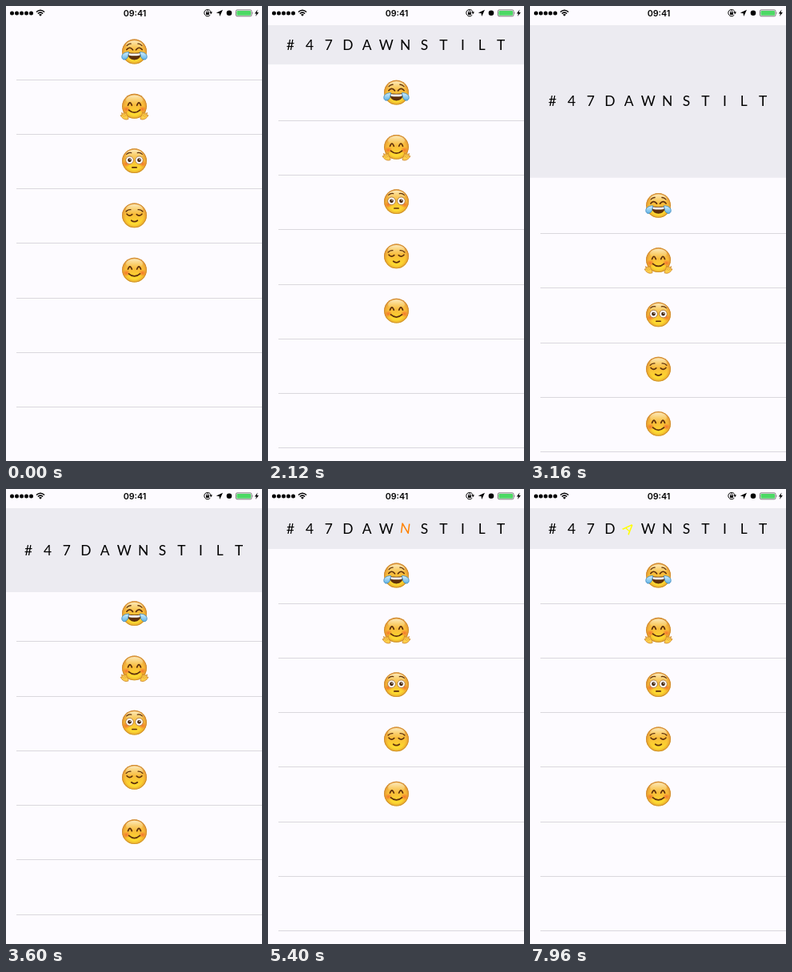
An HTML page for the animation above (8000 ms loop, 320 by 569 pixels).

```html
<!DOCTYPE html>
<html lang="en">
<head>
<meta charset="utf-8">
<title>Pull to refresh</title>
<style>
html, body { margin: 0; width: 100%; height: 100%; overflow: hidden; background: #fdfbff; }
svg { display: block; width: 100%; height: 100%; }
.clock { font: 600 10.7px Inter, Roboto, sans-serif; text-anchor: middle; }
.letter { font: 400 17.4px Lato, "Open Sans", sans-serif; text-anchor: middle; }
.ink { fill: none; stroke: #5e300c; stroke-width: 1.7; stroke-linecap: round; stroke-linejoin: round; }
.thin { stroke-width: 1.3; }
</style>
</head>
<body>
<svg viewBox="0 0 320 569">
  <defs>
    <linearGradient id="skin" x2="0" y2="1">
      <stop offset="0" stop-color="#f3bd58"/>
      <stop offset=".45" stop-color="#f8bb3a"/>
      <stop offset=".75" stop-color="#fdd32f"/>
      <stop offset="1" stop-color="#ffe736"/>
    </linearGradient>
    <radialGradient id="rim">
      <stop offset=".72" stop-color="#d8842a" stop-opacity="0"/>
      <stop offset=".9" stop-color="#d8842a" stop-opacity=".4"/>
      <stop offset="1" stop-color="#bd7426" stop-opacity=".95"/>
    </radialGradient>
    <linearGradient id="shine" x2="0" y2="1">
      <stop offset="0" stop-color="#fff5d0" stop-opacity=".85"/>
      <stop offset="1" stop-color="#ffdf80" stop-opacity=".1"/>
    </linearGradient>
    <radialGradient id="rosy">
      <stop offset="0" stop-color="#f2602c" stop-opacity=".8"/>
      <stop offset="1" stop-color="#f2602c" stop-opacity="0"/>
    </radialGradient>
    <linearGradient id="water" x2="0" y2="1">
      <stop offset="0" stop-color="#d3effc"/>
      <stop offset="1" stop-color="#5fb2e6"/>
    </linearGradient>
    <clipPath id="window"><rect id="windowRect" x="0" y="24" width="320" height="0"/></clipPath>

    <g id="face">
      <circle r="15.4" fill="url(#skin)"/>
      <circle r="15.4" fill="url(#rim)"/>
      <ellipse cy="-8" rx="10.6" ry="5.8" fill="url(#shine)"/>
    </g>
    <g id="blush">
      <ellipse cx="-10" cy="3.8" rx="5" ry="4.4" fill="url(#rosy)"/>
      <ellipse cx="10" cy="3.8" rx="5" ry="4.4" fill="url(#rosy)"/>
    </g>
    <path id="happyEyes" class="ink" d="M-8-1Q-5.6-7.6-3.2-1M3.2-1Q5.6-7.6 8-1"/>
    <path id="smile" class="ink" d="M-7 4.8Q0 11 7 4.8"/>
    <path id="tear" d="M-6.8 .6C-12 .2-17 3.4-15.4 8.2C-13.6 11.8-8.8 9.8-8 6Q-7.4 3-6.8 .6Z" fill="url(#water)" stroke="#3784bd" stroke-width=".8"/>
    <g id="hand">
      <path d="M-7.6 16.2C-11.6 17.6-15.2 15.6-17.4 11.4L-15.4 11.6L-15.9 8L-13.8 10.2L-13.2 6.6L-11.6 9.4L-10.2 7.2L-9.4 11.6Q-7.2 13-7.6 16.2Z" fill="#fdcf4a" stroke="#d18a2e" stroke-width=".9" stroke-linejoin="round"/>
      <path d="M-14.4 11.4L-12.6 13.6M-12.2 10L-11 12.8" stroke="#d18a2e" stroke-width=".6"/>
    </g>

    <g id="joy">
      <use href="#face"/>
      <path class="ink" d="M-9.6-2.4Q-6-7.2-2-2.2M2-2.2Q6-7.2 9.6-2.4"/>
      <path class="ink thin" d="M-9.4-7.4Q-7.2-10-4.4-9.8M9.4-7.4Q7.2-10 4.4-9.8"/>
      <path d="M-9 1Q0 2.4 9 1Q8 10.2 0 10.4Q-8 10.2-9 1Z" fill="#5e300c"/>
      <path d="M-7.6 1.9Q0 3.1 7.6 1.9L6.8 4.8Q0 5.8-6.8 4.8Z" fill="#fff"/>
      <use href="#tear"/><use href="#tear" transform="scale(-1 1)"/>
    </g>
    <g id="hug">
      <use href="#face"/><use href="#blush"/><use href="#happyEyes"/><use href="#smile"/>
      <use href="#hand"/><use href="#hand" transform="scale(-1 1)"/>
    </g>
    <g id="flushed">
      <use href="#face"/><use href="#blush"/>
      <path class="ink thin" d="M-9.8-8.2Q-7.2-10.8-3.8-10M9.8-8.2Q7.2-10.8 3.8-10"/>
      <g fill="#fff" stroke="#a9743a" stroke-width=".9">
        <circle cx="-6" cy="-.8" r="4.8"/><circle cx="6" cy="-.8" r="4.8"/>
      </g>
      <g fill="#43250f"><circle cx="-6" cy="-.8" r="2.4"/><circle cx="6" cy="-.8" r="2.4"/></g>
      <g fill="#fff"><circle cx="-5.4" cy="-1.6" r=".7"/><circle cx="6.6" cy="-1.6" r=".7"/></g>
      <path class="ink" d="M-2.6 8.4H2.6"/>
    </g>
    <g id="calm">
      <use href="#face"/>
      <path class="ink thin" d="M-10.4-4.8Q-8-7.6-4.6-7.2M10.4-4.8Q8-7.6 4.6-7.2"/>
      <path class="ink" d="M-9.4-1.6Q-6.2 2-2.8-1.2M9.4-1.6Q6.2 2 2.8-1.2"/>
      <path class="ink" d="M-3.8 6.4Q0 9.4 3.8 6.4"/>
    </g>
    <g id="glad">
      <use href="#face"/><use href="#blush"/><use href="#happyEyes"/><use href="#smile"/>
    </g>
  </defs>

  <rect width="320" height="569" fill="#fdfbff"/>
  <rect id="header" y="24" width="320" height="0" fill="#ecebf1"/>
  <g clip-path="url(#window)"><g id="title"></g></g>
  <g id="lines" fill="#dad8dd"></g>
  <g id="list"></g>

  <g id="status">
    <g id="signal"></g>
    <g fill="none" stroke="#000" stroke-width="1.5">
      <path d="M37.9 7.5Q43 2.9 48.1 7.5M39.8 9.5Q43 6.7 46.2 9.5"/>
    </g>
    <path d="M41 10.7Q43 9.1 45 10.7L43 12.8Z"/>
    <text class="clock" x="161" y="12.6">09:41</text>
    <path d="M255.3 11.2A4.2 4.2 0 1 1 256.2 8.2" fill="none" stroke="#000"/>
    <path d="M254.4 7.6H258L256.2 10.2Z"/>
    <rect x="250" y="8" width="4" height="3"/>
    <path d="M250.8 8V7A1.2 1.2 0 0 1 253.2 7V8" fill="none" stroke="#000" stroke-width=".8"/>
    <path d="M271 4.8L267.2 13L266.6 9.2L262.8 8.6Z"/>
    <circle cx="279" cy="8.8" r="3.3"/>
    <rect x="287.4" y="4.9" width="19.6" height="7.9" rx="1.6" fill="#fff" stroke="#555" stroke-width=".8"/>
    <rect x="288.4" y="5.9" width="17.6" height="5.9" rx=".8" fill="#4cd964"/>
    <path d="M307.8 7.2Q309.4 8.8 307.8 10.4Z" fill="#555"/>
    <path d="M314.6 4.6L310.8 9.4H313L312 13L315.9 8.1H313.6Z"/>
  </g>
</svg>

<script>
const LOOP = 8000, STEP = 40, ROW = 68.27, TOP = 24;
const WORD = "#47DAWNSTILT";
const COLORS = ["#ff00ff", "#996633", "#ffff00", "#ff0000", "#00ff00", "#0000ff", "#ff8000"];
const REST = 51, PEAK = 205, RELEASE = 3380, SPIN_START = 4280;
const TURN = 116.7, BACK = 66.7, SLOT = TURN + BACK;
const GROW = 366.7, SHRINK = 266.7;
const SPIN = SLOT * WORD.length, CYCLE = SPIN + GROW + SHRINK;

// Finger drag: time, offset, speed in px per ms
const DRAG = [
  [1440, 0, 0.03], [1680, 13.2, 0.072], [2000, 38, 0.1],
  [2520, 101.7, 0.125], [3160, 192.3, 0.095], [RELEASE, PEAK, 0.02]
];

const byId = id => document.getElementById(id);
function add(parent, tag, attrs, text) {
  const el = document.createElementNS("http://www.w3.org/2000/svg", tag);
  for (const key in attrs) el.setAttribute(key, attrs[key]);
  if (text) el.textContent = text;
  return parent.appendChild(el);
}

for (let i = 0; i < 5; i++) add(byId("signal"), "circle", { cx: 7.5 + 6 * i, cy: 8.9, r: 2.5 });
["joy", "hug", "flushed", "calm", "glad"].forEach((name, i) =>
  add(byId("list"), "use", { href: "#" + name, x: 160.5, y: 57 + ROW * i }));
const lines = Array.from({ length: 8 }, () => add(byId("lines"), "rect", { x: 13, width: 307, height: 1 }));
const letters = [...WORD].map(ch => add(byId("title"), "text", { class: "letter", y: 6.3 }, ch));

function hermite([t0, a, va], [t1, b, vb], t) {
  const d = t1 - t0, s = (t - t0) / d, r = 1 - s;
  return r * r * (1 + 2 * s) * a + s * s * (3 - 2 * s) * b + s * r * d * (r * va - s * vb);
}

function pull(t) {
  if (t <= DRAG[0][0]) return 0;
  if (t >= RELEASE) {
    const u = (t - RELEASE) * 0.0109;
    return REST + (PEAK - REST) * (1 + u) * Math.exp(-u);
  }
  const i = DRAG.findIndex(p => p[0] > t);
  return hermite(DRAG[i - 1], DRAG[i], t);
}

function titleState(t) {
  const state = { active: -1, angle: 0, color: "#000", scale: 1 };
  if (t < SPIN_START) return state;
  const round = Math.floor((t - SPIN_START) / CYCLE);
  const u = (t - SPIN_START) % CYCLE;
  if (u < SPIN) {
    state.active = Math.floor(u / SLOT);
    const v = u % SLOT;
    const turning = v < TURN;
    state.angle = 45 * (turning ? v / TURN : (SLOT - v) / BACK);
    if (turning) state.color = COLORS[(round * WORD.length + state.active) % COLORS.length];
  } else {
    const v = u - SPIN;
    state.scale = 1 + 0.5 * (v < GROW ? v / GROW : (CYCLE - u) / SHRINK);
  }
  return state;
}

function draw(t) {
  const offset = pull(t);
  const height = pull(t - 1000 / 60);   // the header trails the list by one refresh
  byId("header").setAttribute("height", height);
  byId("windowRect").setAttribute("height", height);
  byId("list").setAttribute("transform", `translate(0 ${offset})`);
  lines.forEach((line, i) => line.setAttribute("y", Math.floor(23.9 + ROW * (i + 1) + offset)));

  const { active, angle, color, scale } = titleState(t);
  const mid = TOP + height / 2 - 0.3;
  letters.forEach((el, i) => {
    const on = i === active;
    el.setAttribute("transform", `translate(${28 + 23.93 * i} ${mid}) rotate(${on ? angle : 0}) scale(${scale})`);
    el.setAttribute("fill", on ? color : "#000");
  });
  letters[0].setAttribute("visibility", height < 18 ? "hidden" : "visible");
}

function tick() {
  const t = performance.now() % LOOP;
  draw(Math.floor(t / STEP) * STEP);
  requestAnimationFrame(tick);
}
tick();
</script>
</body>
</html>
```
